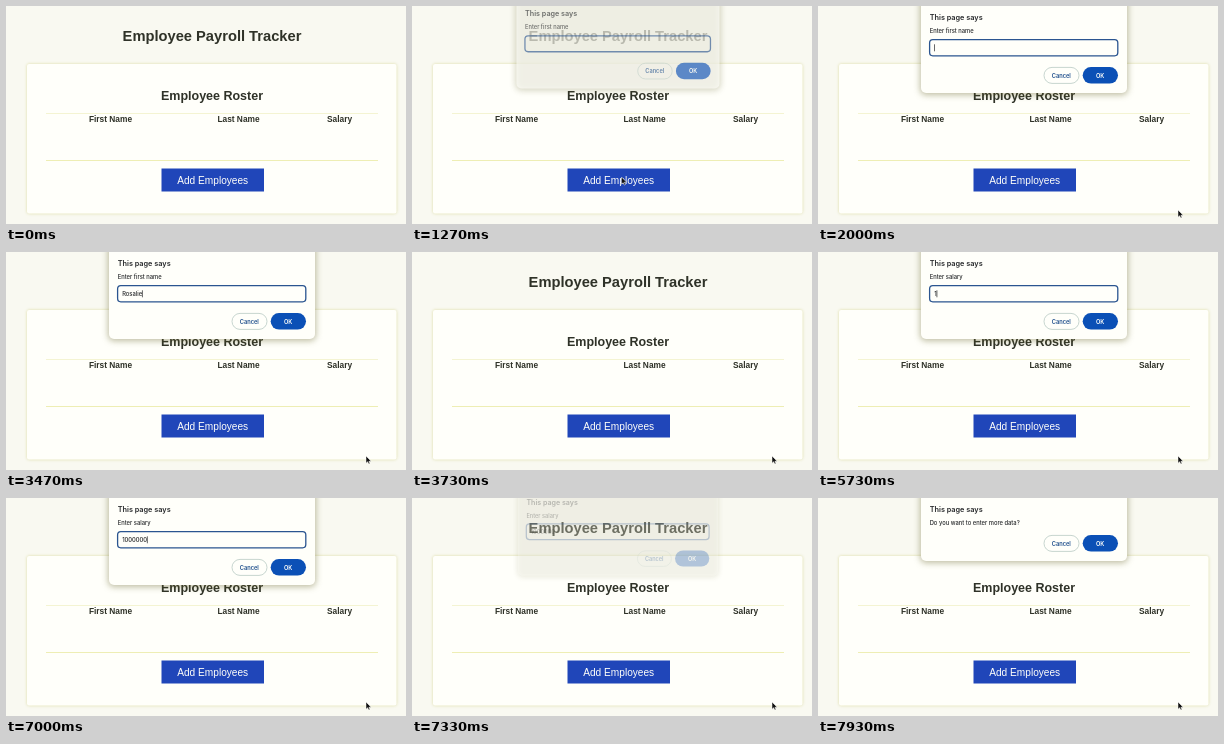
Animation, 400 px wide and 218 px high, one loop 8 s. Source, as an HTML page:

```html
<!DOCTYPE html>
<html lang="en">
<head>
<meta charset="utf-8">
<title>Payroll Tracker</title>
<style>
  html, body { margin: 0; height: 100%; overflow: hidden; background: #f9f9f1; }
  svg { display: block; width: 100%; height: 100%; }
  .page { font-family: "Liberation Sans", Arial, sans-serif; fill: #2f3228; text-anchor: middle; }
  .bold { font-weight: 700; }
  .card { filter: drop-shadow(0 0 1.5px #dddca4); }
  #dialog { font: 500 5.8px Inter, sans-serif; fill: #26282a; }
  #dialog > * { opacity: var(--shown); }
  .shadow { filter: blur(3px); }
  .pill { font-weight: 600; font-size: 5.7px; text-anchor: middle; }
</style>
</head>
<body>
<svg viewBox="0 0 400 218">
  <rect width="400" height="218" fill="#f9f9f1"/>
  <g class="page">
    <text class="bold" x="206" y="35.2" font-size="14.7">Employee Payroll Tracker</text>
    <rect class="card" x="21" y="58" width="369.5" height="149.5" rx="2" fill="#fffffa"/>
    <text class="bold" x="206" y="94" font-size="12.5">Employee Roster</text>
    <g class="bold" font-size="8.35">
      <text x="104.5" y="116">First Name</text>
      <text x="232.5" y="116">Last Name</text>
      <text x="333.5" y="116">Salary</text>
    </g>
    <path d="M40 107.5H372" stroke="#f4f4d2"/>
    <path d="M40 154.5H372" stroke="#eeeeb4"/>
    <rect x="155.5" y="162.5" width="102.5" height="23" fill="#2046b9"/>
    <text x="206.7" y="177.6" font-size="10.15" style="fill:#fffffa">Add Employees</text>
  </g>

  <g id="dialog">
    <rect id="shadow" class="shadow" x="102" y="-20" width="208" rx="6" fill="#5c5a20" fill-opacity=".4"/>
    <rect id="sheet" x="103" y="-20" width="206" rx="5" fill="#fffffa"/>
    <text x="111.7" y="13.8" font-size="7.3" font-weight="600">This page says</text>
    <text id="label" x="111.7" y="27.2"></text>
    <g id="field">
      <rect x="111.6" y="33.6" width="188.2" height="16.2" rx="3.2" fill="none" stroke="#2b5590" stroke-width="1.3"/>
      <text id="entry" x="116.2" y="43.8"></text>
      <path id="caret" d="M0 38.3V45.3" stroke="#26282a" stroke-width=".7"/>
    </g>
    <g id="buttons" class="pill">
      <rect x="226" y="61.4" width="35" height="16" rx="8" fill="none" stroke="#b9cbc4" stroke-width=".8"/>
      <text x="243.3" y="71.5" fill="#1f4f8c">Cancel</text>
      <rect x="264.7" y="61" width="35.3" height="16.6" rx="8.3" fill="#0b50b6"/>
      <text x="282.2" y="71.5" fill="#fffffa">OK</text>
    </g>
  </g>

  <path id="cursor" d="M0 0V7.2L1.7 5.7L2.8 8.1L4 7.5L2.9 5.2H5.2Z" fill="#111" stroke="#fffffa" stroke-width=".5"/>
</svg>
<script>
const LOOP = 8000, FADE_IN = 180, FADE_OUT = 140;
const el = id => document.getElementById(id);
const clamp = v => Math.min(1, Math.max(0, v));
const ease = v => v * v * (3 - 2 * v);

// keys: the moment each character of text appears
const dialogs = [
  { label: 'Enter first name', text: 'Rosalie', open: 1155, close: 3570,
    keys: [2470, 2530, 2730, 2870, 3000, 3200, 3270] },
  { label: 'Enter last name', text: 'Fenrow', open: 3750, close: 5100,
    keys: [4200, 4330, 4400, 4470, 4530, 4600] },
  { label: 'Enter salary', text: '1000000', open: 5270, close: 7230,
    keys: [5730, 5930, 6130, 6270, 6670, 6870, 7000] },
  { label: 'Do you want to enter more data?', open: 7370, close: Infinity }
];

// time, x, y of the pointer tip
const pointerPath = [
  [70, 290, 219], [530, 214, 177], [870, 214, 177], [1100, 209.5, 171],
  [1300, 209.5, 171], [1600, 360, 204], [LOOP, 360, 204]
];

function drawDialog(t) {
  const d = dialogs.findLast(d => t >= d.open);
  const shown = d ? Math.min(clamp((t - d.open) / FADE_IN), clamp((d.close + FADE_OUT - t) / FADE_OUT)) : 0;
  const hidden = 1 - shown;
  el('dialog').style.setProperty('--shown', shown);
  if (!shown) return;
  const isPrompt = Boolean(d.text);
  // slides down and grows slightly as it fades in
  el('dialog').setAttribute('transform',
    `translate(206 ${41 - 11 * hidden}) scale(${1 - 0.04 * hidden}) translate(-206 -41)`);
  el('label').textContent = d.label;
  el('sheet').setAttribute('height', isPrompt ? 107 : 83);
  el('shadow').setAttribute('height', isPrompt ? 109 : 85);
  el('buttons').setAttribute('transform', `translate(0 ${isPrompt ? 0 : -24})`);
  el('field').setAttribute('visibility', isPrompt ? 'visible' : 'hidden');
  if (!isPrompt) return;
  const entry = el('entry');
  entry.textContent = d.text.slice(0, d.keys.filter(k => t >= k).length);
  const caretX = 116.5 + entry.getComputedTextLength();
  el('caret').setAttribute('transform', `translate(${caretX} 0)`);
  el('caret').setAttribute('opacity', shown < 1 ? 0 : 1);
}

function drawPointer(t) {
  const next = pointerPath.findIndex(p => t < p[0]);
  el('cursor').setAttribute('visibility', next > 0 ? 'visible' : 'hidden');
  if (next < 1) return;
  const [t0, x0, y0] = pointerPath[next - 1], [t1, x1, y1] = pointerPath[next];
  const k = ease((t - t0) / (t1 - t0));
  el('cursor').setAttribute('transform', `translate(${x0 + (x1 - x0) * k} ${y0 + (y1 - y0) * k})`);
}

const start = performance.now();
function frame() {
  const t = (performance.now() - start) % LOOP;
  drawDialog(t);
  drawPointer(t);
  requestAnimationFrame(frame);
}
frame();
</script>
</body>
</html>
```
